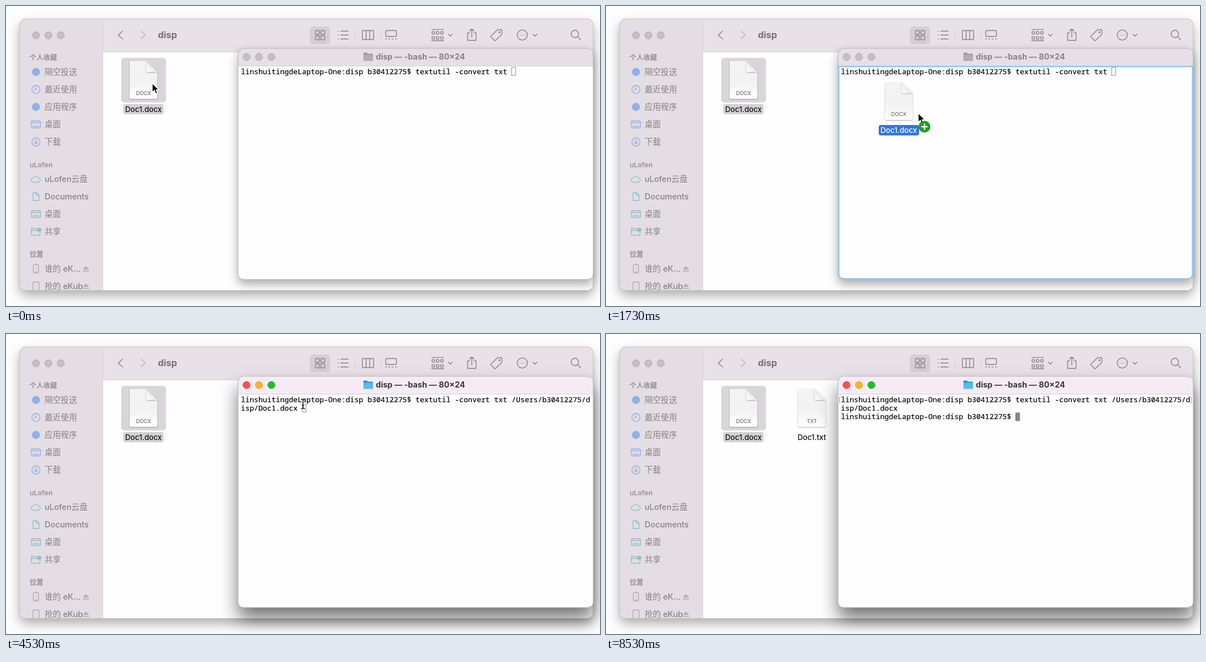
An HTML page that plays this animation: 1052 by 532 pixels, repeating every 8.59 s.

```html
<!DOCTYPE html>
<html lang="zh">
<head>
<meta charset="utf-8">
<style>
html, body { margin: 0; width: 100%; height: 100%; overflow: hidden; background: #fefefe; }
svg { display: block; width: 100%; height: 100%; }
text { font-family: Inter, "Noto Sans CJK SC", "Noto Sans CJK", sans-serif; white-space: pre; }
.mono { font: 12.9px "Noto Sans Mono", "DejaVu Sans Mono", monospace; fill: #000; stroke: #000; stroke-width: .2; }
.mid { text-anchor: middle; }
.line { fill: none; stroke-width: 1.4; stroke-linecap: round; stroke-linejoin: round; }
.tool { stroke: #888188; stroke-width: 1.6; }
.finder { filter: drop-shadow(0 9px 10px rgba(0,0,0,.32)); }
.idle { filter: drop-shadow(0 8px 9px rgba(0,0,0,.34)); }
.active { filter: drop-shadow(0 19px 16px rgba(0,0,0,.55)); }
</style>
</head>
<body>
<svg id="stage" viewBox="0 0 1052 532" preserveAspectRatio="none"></svg>
<script>
const LOOP = 8590, DRAG = 420, DROP = 1750, FOCUS = 4400, BLOCK = 4620, ENTER = 5340, FILE = 5740;
const GRAB = [278, 152.5];
const HOST = 'linshuitingdeLaptop-One', USER = 'b30412275';
const PROMPT = `${HOST}:disp ${USER}$ `;
const COMMAND = 'textutil -convert txt ';
const PATH = `/Users/${USER}/disp/Doc1.docx `;
const CELL = 7.74, COLS = 80;

// Pointer stops: time, x, y
const STOPS = [
  [0, 259, 137], [300, 259, 137], [1200, 539, 186], [1420, 539, 186],
  [1700, 553, 190], [3800, 553, 190], [4330, 526, 124], [LOOP, 526, 124]
];

const text = (x, y, size, fill, str, weight = 400, cls = '') =>
  `<text x="${x}" y="${y}" font-size="${size}" fill="${fill}" font-weight="${weight}" class="${cls}">${str}</text>`;
const line = (d, extra = '') => `<path class="line" d="${d}" ${extra}/>`;
const box = (x, y, w, h, r, attrs) =>
  `<rect x="${x}" y="${y}" width="${w}" height="${h}" rx="${r}" ${attrs}/>`;
const lights = (x, y, fills, strokes) => fills.map((f, i) =>
  `<circle cx="${x + 22 * i}" cy="${y}" r="6.4" fill="${f}" stroke="${strokes[i]}" stroke-width=".8"/>`).join('');
const GREYS = Array(3).fill('#c5bec5'), RIMS = Array(3).fill('#ada6ad');

// A page icon with its folded corner, centred on x = 0
const page = kind => `
  <path d="M-22.500 97.500H5L24.500 117V162Q24.500 164.500 22 164.500H-22Q-24.500 164.500 -24.500 162V100Q-24.500 97.500 -22 97.500Z" fill="url(#paper)" filter="url(#lift)"/>
  <path d="M5 97.500L24.500 117H8.500Q5 117 5 113.500Z" fill="url(#fold)" filter="url(#lift)"/>
  ${text(0, 157.500, 9.3, '#5c5a5c', kind, 400, 'mid')}`;
const label = (str, fill) => text(0, 187.7, 13.2, fill, str, 500, 'mid');

// Sidebar glyphs, centred on the origin
const circle = '<circle class="line" r="7.2"/>';
const dot = '<circle r="7.2" fill="currentColor" stroke="none"/>';
const glyphs = {
  dot,
  clock: circle + line('M0 -4V.500H-3.500'),
  desk: box(-8, -6, 16, 12, 1.8, 'class="line"') + line('M-8 -2.700H8M-5 3.300H5'),
  down: circle + line('M0 -3.700V3.500M-3 .600L0 3.600L3 .600'),
  cloud: line('M-4.500 5.500H4.500A3.600 3.600 0 0 0 5 -1.500A5 5 0 0 0 -4 -2.600A4 4 0 0 0 -4.500 5.500Z'),
  doc: line('M-5 -7H1L5.500 -2.500V7H-5ZM1 -7V-2.500H5.500'),
  share: line('M3 -4.500H-1.500L-3 -6H-8V6.500H7V2M-8 -2H2') + '<circle cx="6" cy="-3" r="3.700" fill="currentColor" stroke="none"/>',
  phone: box(-4.5, -7.5, 9, 15, 2, 'class="line"') + line('M-1.500 5.500H1.500'),
  tablet: box(-5.5, -7.5, 11, 15, 2, 'class="line"')
};
const BLUE = '#8fb2e6', TEAL = '#8fbfcd', MAUVE = '#b3abb3';
const row = (y, glyph, str, color) =>
  `<g transform="translate(53 ${y})" stroke="${color}" color="${color}">${glyphs[glyph]}</g>` +
  text(68.5, y + 5.2, 14.3, '#888188', str, 500);
const heading = (y, str) => text(42, y, 12.1, '#958e95', str, 600);
const eject = y => `<path d="M136 ${y + 1}L141.500 ${y - 5}L147 ${y + 1}ZM136 ${y + 2.7}H147V${y + 4.4}H136Z" fill="#b3abb3"/>`;

const sidebar = heading(95.5, '个人收藏') + row(117, 'dot', '隔空投送', BLUE) +
  row(148, 'clock', '最近使用', BLUE) + row(179, 'dot', '应用程序', BLUE) +
  row(210, 'desk', '桌面', BLUE) + row(241, 'down', '下载', BLUE) +
  heading(286, 'uLofen') + row(307, 'cloud', 'uLofen云盘', TEAL) + row(338, 'doc', 'Documents', TEAL) +
  row(369, 'desk', '桌面', TEAL) + row(400, 'share', '共享', TEAL) +
  heading(444.5, '位置') + row(466, 'phone', '谁的 eK...', MAUVE) + eject(466) +
  row(497, 'tablet', '抢的 eKub', MAUVE) + eject(497);

const square = (x, y, w, h = w) => box(x, y, w, h, 1.3, 'class="line"');
const grid = [0, 1, 2, 3].map(i => square(548 + 9.5 * (i % 2), 43.5 + 9.5 * (i >> 1), 7)).join('');
const list = [44.5, 51.5, 58.5].map(y => line(`M588 ${y}h.500M593 ${y}H606`)).join('');
const groups = [0, 1, 2, 3, 4, 5].map(i => square(754.5 + 7.6 * (i % 3), 45.5 + 9 * (i / 3 | 0), 4.6)).join('');
const toolbar = `
  ${box(538, 36.5, 36, 31, 6, 'fill="#d5ced5"')}
  <path d="M618.500 41V62M663.500 41V62" stroke="#d3ccd3"/>
  <g class="tool">
    ${line('M206.500 44.500L199 51.500L206.500 58.500', 'stroke-width="2"')}
    ${line('M239 44.500L246.500 51.500L239 58.500', 'stroke="#bdb6bd" stroke-width="2"')}
    ${grid}${list}
    ${box(631, 43.5, 20, 16, 2, 'class="line"')}${line('M637.700 44V59M644.300 44V59')}
    ${box(672.5, 43.5, 19, 10.5, 2, 'class="line"')}${line('M672.500 58.500h1.500M678.200 58.500h1.500M684 58.500h1.500M690 58.500h1.500', 'stroke-width="2.500"')}
    ${groups}${line('M754 41.600H775M754 61.500H775')}
    ${line('M783.500 50L787 53.500L790.500 50M933.500 50L937 53.500L940.500 50')}
    ${line('M821 47.500H817.500V61H832.500V47.500H829M825 55V40.500M821 44.500L825 40.500L829 44.500')}
    ${line('M859 53L869.500 43Q870.500 42 872 42H877Q878.500 42 878.500 43.500V48.500Q878.500 50 877.500 51L867 61Q866 62 865 61L859 55Q858 54 859 53Z')}
    <circle cx="874" cy="46.500" r="1" class="line"/>
    <circle cx="914.500" cy="51.500" r="9" class="line"/>
    ${line('M910.500 51.500h.100M914.500 51.500h.100M918.500 51.500h.100', 'stroke-width="2.400"')}
    <circle cx="1007.500" cy="49.500" r="6.500" class="line"/>${line('M1012.500 54.500L1017.500 59.500')}
  </g>
  ${text(269, 57, 16.3, '#777077', 'disp', 700)}`;

document.getElementById('stage').innerHTML = `
  <defs>
    <linearGradient id="paper" x2="0" y2="1"><stop stop-color="#f5f4f5"/><stop offset=".6" stop-color="#f3f2f3"/><stop offset="1" stop-color="#fff"/></linearGradient>
    <linearGradient id="fold" x2="1" y1="1" y2="0"><stop stop-color="#fff"/><stop offset="1" stop-color="#d8d6d8"/></linearGradient>
    <filter id="lift" x="-20%" y="-20%" width="140%" height="150%"><feDropShadow dx="0" dy="1" stdDeviation="1.3" flood-opacity=".34"/></filter>
    <clipPath id="frame">${box(24, 23, 1016, 481.5, 11, '')}</clipPath>
    <clipPath id="pane">${box(411, 75, 629, 410, 10, '')}</clipPath>
  </defs>
  ${box(24, 23, 1016, 481.5, 11, 'class="finder" fill="#fff"')}
  <g clip-path="url(#frame)">
    <rect x="24" y="23" width="1016" height="482" fill="#fefefe"/>
    <rect x="172" y="23" width="868" height="58" fill="#e8e1e7"/>
    <rect x="24" y="23" width="148" height="482" fill="#e4dde4"/>
    <path d="M172 81.500H1040M171.500 23V505" stroke="#d9d2d9"/>
    ${sidebar}
  </g>
  ${box(24, 23, 1016, 481.5, 11, 'fill="none" stroke="#c4bec4"')}
  ${lights(53, 52, GREYS, RIMS)}
  ${toolbar}
  ${box(204, 92, 79.5, 79, 5, 'fill="#d9d6d9"')}
  ${box(207.5, 174, 71.5, 18, 4, 'fill="#d3d0d3"')}
  <g transform="translate(243.500)">${page('DOCX')}${label('Doc1.docx', '#111')}</g>
  <g id="made" transform="translate(364.500)">${page('TXT')}${label('Doc1.txt', '#111')}</g>

  <rect id="shade" x="411" y="75" width="629" height="410" rx="10" fill="#fff"/>
  <g clip-path="url(#pane)">
    <rect x="411" y="75" width="629" height="410" fill="#fefefe"/>
    <rect id="bar" x="411" y="75" width="629" height="31"/>
    <path d="M411 106.500H1040" stroke="#d3cdd3"/>
  </g>
  ${box(411, 75, 629, 410, 10, 'fill="none" stroke="#bbb5bb"')}
  <g id="dull">${lights(426, 90.5, GREYS, RIMS)}</g>
  <g id="bright">${lights(426, 90.5, ['#fb5148', '#fbb125', '#1fc023'], ['#e0443e', '#dea123', '#1aab29'])}</g>
  <path id="folderBack" d="M633 85V84Q633 82.500 634.500 82.500H639L641 84.500H648.500Q650 84.500 650 86V90H633Z"/>
  <path id="folder" d="M633 86.500H650V96Q650 97.500 648.500 97.500H634.500Q633 97.500 633 96Z"/>
  <text id="title" x="655" y="95.300" font-size="14.100" font-weight="700">disp — -bash — 80×24</text>
  <path id="halo" d="M412.200 107.200H1038.800V475Q1038.800 483.800 1030 483.800H421Q412.200 483.800 412.200 475Z" fill="none" stroke="#92c6ef" stroke-width="2.400"/>
  ${[0, 1, 2].map(i => `<text class="mono" id="row${i}" x="416" y="${120.5 + 15.4 * i}"></text>`).join('')}
  <path id="marks" d="M415.500 111.500H413.500V122H415.500M1035 111.500H1037V122H1035" fill="none" stroke="#a09aa0"/>
  <rect id="caret" width="7" height="14"/>

  <g id="drag">
    <g transform="translate(243.500)">
      ${page('DOCX')}${box(-35.5, 173.5, 71.5, 18.5, 4, 'fill="#3275dd"')}${label('Doc1.docx', '#fff')}
    </g>
  </g>
  <g id="arrow">
    <path d="M0 0V16L3.700 12.600L6.300 18.600L9.100 17.400L6.600 11.500H11.600Z" fill="#000" stroke="#fff" stroke-width="1.200"/>
    <g id="plus"><circle cx="11" cy="24" r="10" fill="#16a519" stroke="#0c8a10" stroke-width=".8"/><path d="M5.500 24H16.500M11 18.500V29.500" stroke="#fff" stroke-width="2.500"/></g>
  </g>
  <g id="beam">
    ${['#fff', '#111'].map((c, i) => `<path d="M-3.500 -8.500Q0 -8.500 0 -6Q0 -8.500 3.500 -8.500M0 -6V6M-3.500 8.500Q0 8.500 0 6Q0 8.500 3.500 8.500M-2 2.500H2" fill="none" stroke="${c}" stroke-width="${i ? 1.4 : 3}"/>`).join('')}
  </g>`;

const $ = id => document.getElementById(id);
const show = (id, on) => $(id).setAttribute('display', on ? 'inline' : 'none');
const set = (id, attrs) => { for (const k in attrs) $(id).setAttribute(k, attrs[k]); };

function pointer(t) {
  const i = STOPS.findIndex(s => s[0] > t);
  const [t0, x0, y0] = STOPS[i - 1], [t1, x1, y1] = STOPS[i];
  const p = (t - t0) / (t1 - t0), e = p * p * (3 - 2 * p);
  return [x0 + (x1 - x0) * e, y0 + (y1 - y0) * e];
}

function render(t) {
  const [x, y] = pointer(t);
  const focus = t >= FOCUS, done = t >= ENTER;
  const dragging = t >= DRAG && t < DROP, over = dragging && x > 411 && y > 75;

  set('shade', { class: focus ? 'active' : 'idle' });
  set('bar', { fill: focus ? '#f5ebf5' : '#e6dfe5' });
  set('title', { fill: focus ? '#383438' : '#878087' });
  set('folder', { fill: focus ? '#58bdee' : '#b3adb3' });
  set('folderBack', { fill: focus ? '#2195d0' : '#a19ba1' });
  show('bright', focus);
  show('dull', !focus);

  const typed = PROMPT + COMMAND + (t >= DROP ? PATH : '');
  const rows = [typed.slice(0, COLS), typed.slice(COLS), done ? PROMPT : ''];
  rows.forEach((s, i) => { $('row' + i).textContent = s; });
  const last = done ? 2 : rows[1] ? 1 : 0;
  const solid = t >= BLOCK;
  set('caret', {
    x: 416 + rows[last].length * CELL - (solid ? .5 : 0) + (last ? 0 : -.3),
    y: 109 + 15.4 * last - (solid ? .5 : 0),
    width: solid ? 8 : 7, height: solid ? 15 : 14,
    fill: solid ? '#87828a' : 'none', stroke: solid ? 'none' : '#969096'
  });

  show('marks', done);
  show('made', t >= FILE);
  show('halo', over);
  show('plus', over);
  show('drag', dragging);
  show('arrow', !focus);
  show('beam', focus && !done);
  set('drag', { transform: `translate(${x - GRAB[0]} ${y - GRAB[1]})` });
  set('arrow', { transform: `translate(${x} ${y})` });
  set('beam', { transform: `translate(${x} ${y})` });
}

const start = performance.now();
function tick() {
  render((performance.now() - start) % LOOP);
  requestAnimationFrame(tick);
}
tick();
</script>
</body>
</html>
```
